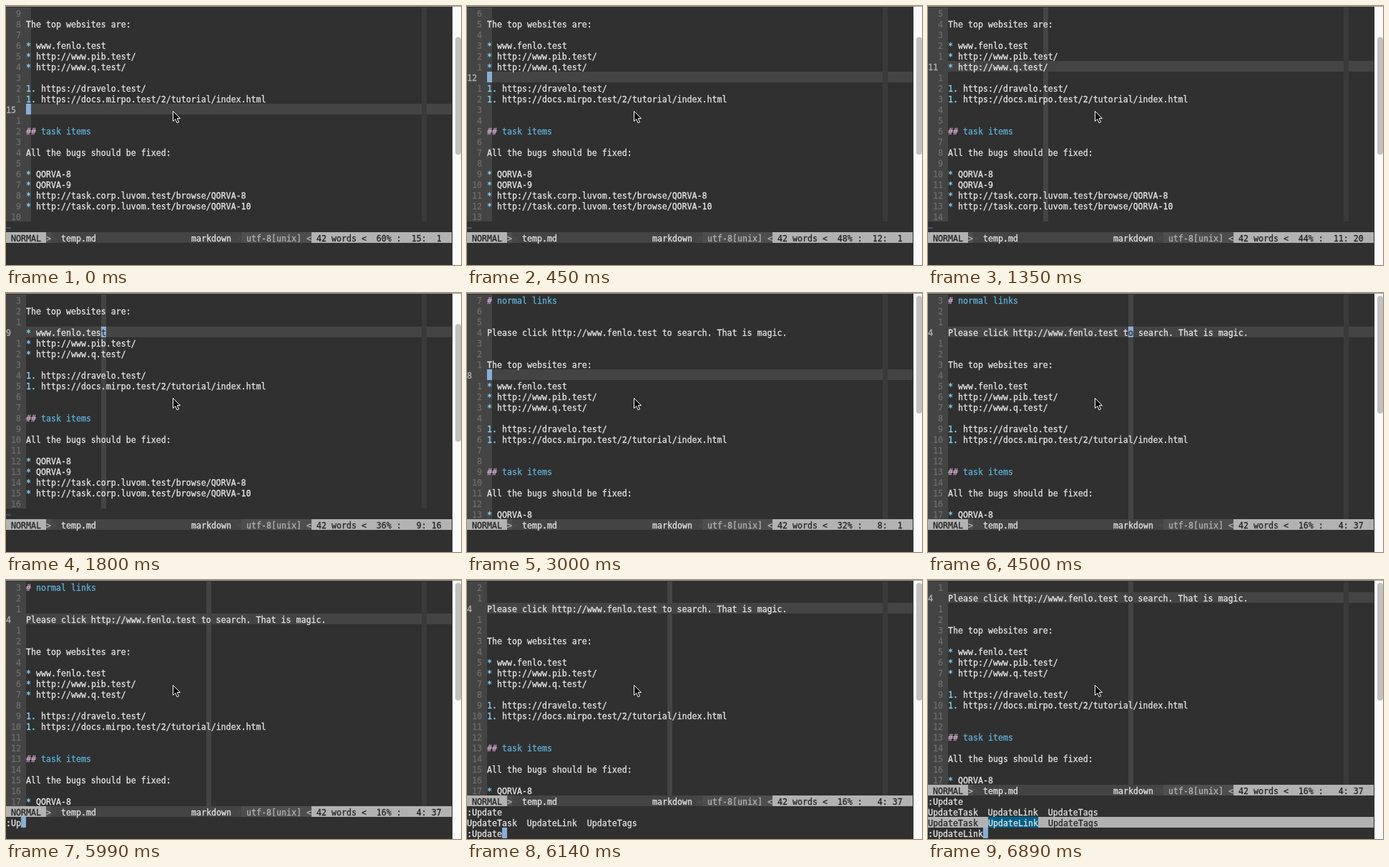
Write an HTML page that moves like this. It is 636x363 px and loops after 8 s.

```html
<!DOCTYPE html>
<html lang="en">
<head>
<meta charset="utf-8">
<title>Editor session</title>
<style>
html, body { margin: 0; width: 100%; height: 100%; overflow: hidden; background: #303030; }
svg { display: block; width: 636px; height: 363px; }
text { font: 11.627px "DejaVu Sans Mono", "Noto Sans Mono", monospace; white-space: pre; stroke-width: .3px; }
</style>
</head>
<body>
<svg viewBox="0 0 636 363">
  <rect width="636" height="363" fill="#303030"/>
  <g id="screen"></g>
  <rect x="624" width="12" height="363" fill="#fafafa"/>
  <rect x="624" width="1" height="363" fill="#ebebeb"/>
  <rect id="thumb" x="628" width="8" height="165" rx="4" fill="#c1c1c1"/>
  <rect width="636" height="1" fill="#a0a0a0"/>
  <path d="M233.5 147.5v14l3.3-3 2.3 5.3 2.4-1-2.3-5.2h4.3z" fill="#000" stroke="#fff"/>
</svg>
<script>
const CW = 7, RH = 15, TOP = 2, COLS = 89, GUTTER = 4, LOOP = 8000;
const C = {
  fg: '#e4e4e4', bg: '#303030', band: '#444444', edge: '#3a3a3a',
  num: '#6c6c6c', numHere: '#b2b2b2', cursor: '#87afd7',
  mark: '#87d7ff', hash: '#d7afd7', title: '#5fafd7', tilde: '#5f5faf',
  bar: '#b2b2b2', barText: '#262626', mid: '#4e4e4e', midText: '#b2b2b2', pick: '#005f87'
};
const doc = `# normal links


Please click http://www.fenlo.test to search. That is magic.


The top websites are:

* www.fenlo.test
* http://www.pib.test/
* http://www.q.test/

1. https://dravelo.test/
1. https://docs.mirpo.test/2/tutorial/index.html


## task items

All the bugs should be fixed:

* QORVA-8
* QORVA-9
* http://task.corp.luvom.test/browse/QORVA-8
* http://task.corp.luvom.test/browse/QORVA-10
`.split('\n');
const menu = ['UpdateTask', 'UpdateLink', 'UpdateTags'];

// time, then what changes: line, col, top line, block cursor, command, rows pushed up, menu pick
const steps = [
  [0, { line: 15, col: 1, top: 6, on: 1, cmd: '', up: 0, pick: -1 }],
  [150, { line: 14, col: 48 }],
  [300, { line: 13, col: 24 }],
  [450, { line: 12, col: 1 }],
  [600, { line: 11, col: 20 }],
  [1350, { on: 0 }],
  [1650, { line: 10, col: 22, on: 1 }],
  [1800, { line: 9, col: 16 }],
  [2550, { on: 0 }],
  [2700, { on: 1 }],
  [3000, { line: 8, col: 1, top: 1 }],
  [3150, { line: 7, col: 21 }],
  [3300, { line: 5, col: 1 }],
  [3750, { line: 4, col: 60 }],
  [4500, { col: 37 }],
  [5250, { on: 0 }],
  [5400, { on: 1 }],
  [5540, { cmd: ':' }],
  [5840, { cmd: ':U' }],
  [5990, { cmd: ':Up' }],
  [6140, { cmd: ':Update', up: 1 }],
  [6440, { cmd: ':' + menu[0], up: 2, pick: 0 }],
  [6890, { cmd: ':' + menu[1], pick: 1 }]
];
let last = {};
const states = steps.map(([t, change]) => (last = { ...last, ...change, t }));

const screen = document.getElementById('screen');
const thumb = document.getElementById('thumb');
let out = '';

function box(row, col, w, fill, h = 1) {
  out += `<rect x="${col * CW}" y="${TOP + row * RH}" width="${w * CW}" height="${h * RH}" fill="${fill}"/>`;
}
function put(row, col, str, ink = C.fg) {
  if (!str.trim()) return;
  const safe = str.replace(/&/g, '&amp;').replace(/</g, '&lt;');
  out += `<text x="${col * CW}" y="${TOP + row * RH + 13}" fill="${ink}" stroke="${ink}">${safe}</text>`;
}
function block(row, col, ch = '') {
  box(row, col, 1, C.cursor);
  put(row, col, ch, C.bg);
}

function drawLine(row, str) {
  const lead = (str.match(/^(#+|\*|\d\.) /) || ['', ''])[1];
  const head = lead[0] === '#';
  put(row, GUTTER, lead, head ? C.hash : C.mark);
  const rest = str.slice(lead.length);
  const pad = rest.length - rest.trimStart().length;
  put(row, GUTTER + lead.length + pad, rest.trimStart(), head ? C.title : C.fg);
}

function drawText(s) {
  const first = s.top + s.up;
  const rows = 21 - s.up;
  const used = Math.min(rows, doc.length - first + 1);
  const here = s.line - first;
  const curCol = s.col + GUTTER - 1;
  box(0, 0, GUTTER, C.band, used);
  box(0, curCol, 1, C.band, used);
  box(here, 0, COLS, C.band);
  box(0, 83, 1, C.edge, used);
  for (let r = 0; r < rows; r++) {
    if (r >= used) { put(r, 0, '~', C.tilde); continue; }
    if (r === here) put(r, 0, String(s.line), C.numHere);
    else {
      const n = String(Math.abs(r - here));
      put(r, 3 - n.length, n, C.num);
    }
    const str = doc[first + r - 1];
    if (r === here && s.on && !s.cmd) {
      const i = s.col - 1;
      drawLine(r, str.slice(0, i));
      put(r, curCol + 1, str.slice(i + 1));
      block(r, curCol, str[i]);
    } else drawLine(r, str);
  }
}

function drawStatus(s) {
  const row = 21 - s.up;
  const pct = String(Math.round(s.line / doc.length * 100)).padStart(3);
  const pos = String(s.line).padStart(4) + ':' + String(s.col).padStart(3);
  box(row, 0, COLS, C.band);
  box(row, 0, 8, C.bar);
  box(row, 8, 1, C.mid);
  box(row, 47, 14, C.mid);
  box(row, 61, COLS - 61, C.bar);
  put(row, 1, 'NORMAL', C.barText);
  put(row, 8, '>', C.midText);
  put(row, 9, '>', C.mid);
  put(row, 11, 'temp.md');
  put(row, 37, 'markdown');
  put(row, 46, '<', C.mid);
  put(row, 48, 'utf-8[unix]', C.midText);
  put(row, 60, '<', C.bar);
  put(row, 62, `42 words < ${pct}% :${pos}`, C.barText);
}

function drawCommand(s) {
  if (!s.cmd) return;
  const row = s.up ? 23 : 22;
  if (s.up) {
    put(22 - s.up, 0, ':Update');
    put(23 - s.up, 0, menu.join('  '));
  }
  if (s.pick >= 0) {
    box(22, 0, COLS, C.bar);
    menu.forEach((name, i) => {
      const picked = i === s.pick;
      if (picked) box(22, i * 12, name.length, C.pick);
      put(22, i * 12, name, picked ? C.fg : C.barText);
    });
  }
  put(row, 0, s.cmd);
  block(row, s.cmd.length);
}

let shown;
function frame(now) {
  const t = now % LOOP;
  const s = states.findLast(x => x.t <= t);
  if (s === shown) return;
  shown = s;
  out = '';
  drawText(s);
  drawStatus(s);
  drawCommand(s);
  screen.innerHTML = out;
  thumb.setAttribute('y', s.top > 1 ? 43.5 : 4);
}
const start = performance.now();
function tick() {
  frame(performance.now() - start);
  requestAnimationFrame(tick);
}
tick();
</script>
</body>
</html>
```
